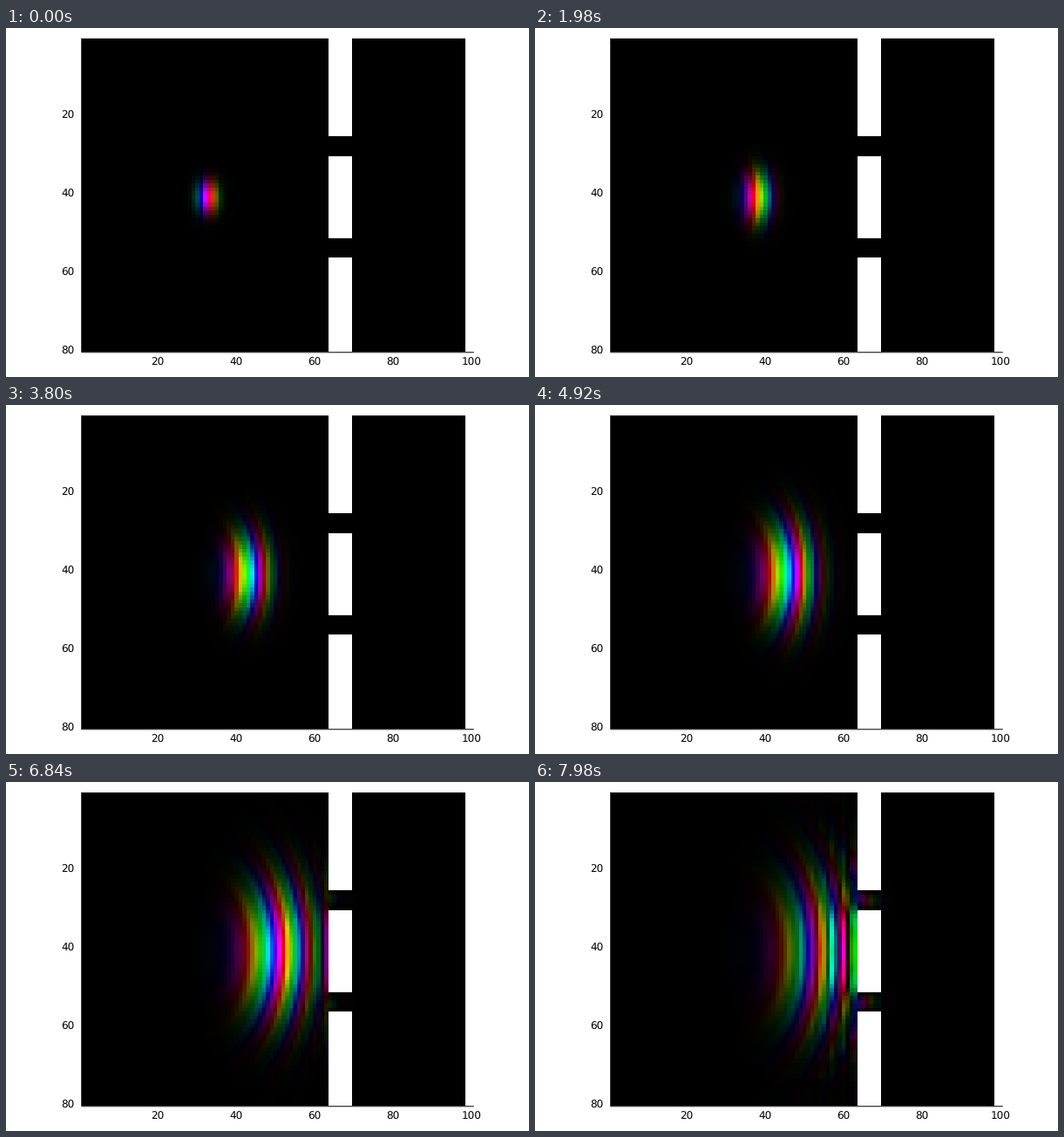
Animation of 600x400 px, one loop 8 s. Source, as a matplotlib script:

```python
import numpy as np
import matplotlib.pyplot as plt
from matplotlib.animation import FuncAnimation
from matplotlib.colors import hsv_to_rgb

plt.rcParams["font.family"] = "DejaVu Sans"
plt.rcParams["text.hinting"] = "none"

# Grid, wall with two slits (cells counted from 1)
COLS, ROWS = 98, 80
WALL = (64, 69)
SLITS = [(26, 30), (52, 56)]

# Wave packet, in cell units
X0, Y0 = 32.5, 41
SX, SY = 1.8, 2.8
K = 0.79
PHASE = np.radians(315)

# Evolution per picture along x and y
TX, TY = 0.158, 0.40
SUBSTEPS = 2
PICTURES = 172

# Stage, axes origin and the pixel box of the heatmap
W, H, CELL = 600, 400, 4.5
AX_X, AX_TOP, AX_Y = 86.75, 11.75, 371.75
LEFT, TOP, RIGHT, BOTTOM = 87, 12, 527, 371


def propagator(size, spans, t):
    """Free 1D motion inside hard-walled spans, zero elsewhere."""
    u = np.zeros((size, size), complex)
    for a, b in spans:
        n = b - a + 1
        j = np.arange(1, n + 1)
        q = np.pi * j / (n + 1)
        s = np.sqrt(2 / (n + 1)) * np.sin(np.outer(j, q))
        u[a - 1:b, a - 1:b] = (s * np.exp(-0.5j * t * q**2)) @ s
    return u


x = np.arange(1, COLS + 1)
y = np.arange(1, ROWS + 1)
in_wall = (x >= WALL[0]) & (x <= WALL[1])
in_slit = np.zeros(ROWS, bool)
for first, last in SLITS:
    in_slit[first - 1:last] = True
solid = ~in_slit[:, None] & in_wall[None, :]

dx, dy = TX / SUBSTEPS, TY / SUBSTEPS / 2
x_open = propagator(COLS, [(1, COLS)], dx)
x_split = propagator(COLS, [(1, WALL[0] - 1), (WALL[1] + 1, COLS)], dx)
y_open = propagator(ROWS, [(1, ROWS)], dy)
y_slits = propagator(ROWS, SLITS, dy)


def move_y(psi):
    out = y_open @ psi
    out[:, in_wall] = y_slits @ psi[:, in_wall]
    return out


def move_x(psi):
    out = psi @ x_split
    out[in_slit] = psi[in_slit] @ x_open
    return out


def colour(psi):
    """Hue from the phase, brightness from the density."""
    density = np.abs(psi) ** 2
    hue = (np.angle(psi) / (2 * np.pi)) % 1
    hsv = np.dstack([hue, np.ones_like(hue), density / density.max()])
    rgb = hsv_to_rgb(hsv)
    rgb[solid] = 1
    return (rgb * 255).round().astype(np.uint8)


def simulate():
    gx = np.exp(-((x - X0) / (2 * SX)) ** 2 + 1j * (K * (x - X0) + PHASE))
    gy = np.exp(-((y - Y0) / (2 * SY)) ** 2)
    psi = np.outer(gy, gx)
    psi[solid] = 0
    pictures = []
    for _ in range(PICTURES):
        pictures.append(colour(psi))
        for _ in range(SUBSTEPS):
            psi = move_y(move_x(move_y(psi)))
    return pictures


def cell_index(pixels, cells):
    """Cell under the centre of each pixel."""
    return ((np.arange(pixels) + 0.5) * cells / pixels).astype(int)


pictures = simulate()
cells = np.ix_(cell_index(BOTTOM - TOP, ROWS), cell_index(RIGHT - LEFT, COLS))

fig = plt.figure(figsize=(W / 100, H / 100), dpi=100, facecolor="white")
ax = fig.add_axes([0, 0, 1, 1])
image = ax.imshow(pictures[0][cells], extent=(LEFT, RIGHT, BOTTOM, TOP),
                  interpolation="nearest", aspect="auto")
ax.set_xlim(0, W)
ax.set_ylim(H, 0)
ax.axis("off")

# Axis lines and tick labels
line = dict(color="black", lw=0.72, snap=False, solid_capstyle="butt")
ax.plot([AX_X, AX_X], [AX_TOP, AX_Y], **line)
ax.plot([AX_X, AX_X + 100 * CELL], [AX_Y, AX_Y], **line)
font = dict(fontsize=12 * 0.72, color="black", va="center_baseline")
for v in range(20, 101, 20):
    ax.text(AX_X + (v - 0.5) * CELL - 0.5, 382.5, str(v), ha="center", **font)
for v in range(20, 81, 20):
    ax.text(78.5, AX_TOP + (v - 0.5) * CELL, str(v), ha="right", **font)


def update(tick):
    # Uneven pacing: pictures last 20, 100 and 20 ms in turn
    cycle, part = divmod(tick, 7)
    step = 0 if part < 1 else 1 if part < 6 else 2
    image.set_data(pictures[min(3 * cycle + step, PICTURES - 1)][cells])
    return [image]


anim = FuncAnimation(fig, update, frames=400, interval=20,
                     repeat=True, repeat_delay=0, blit=False)
plt.show()
```
